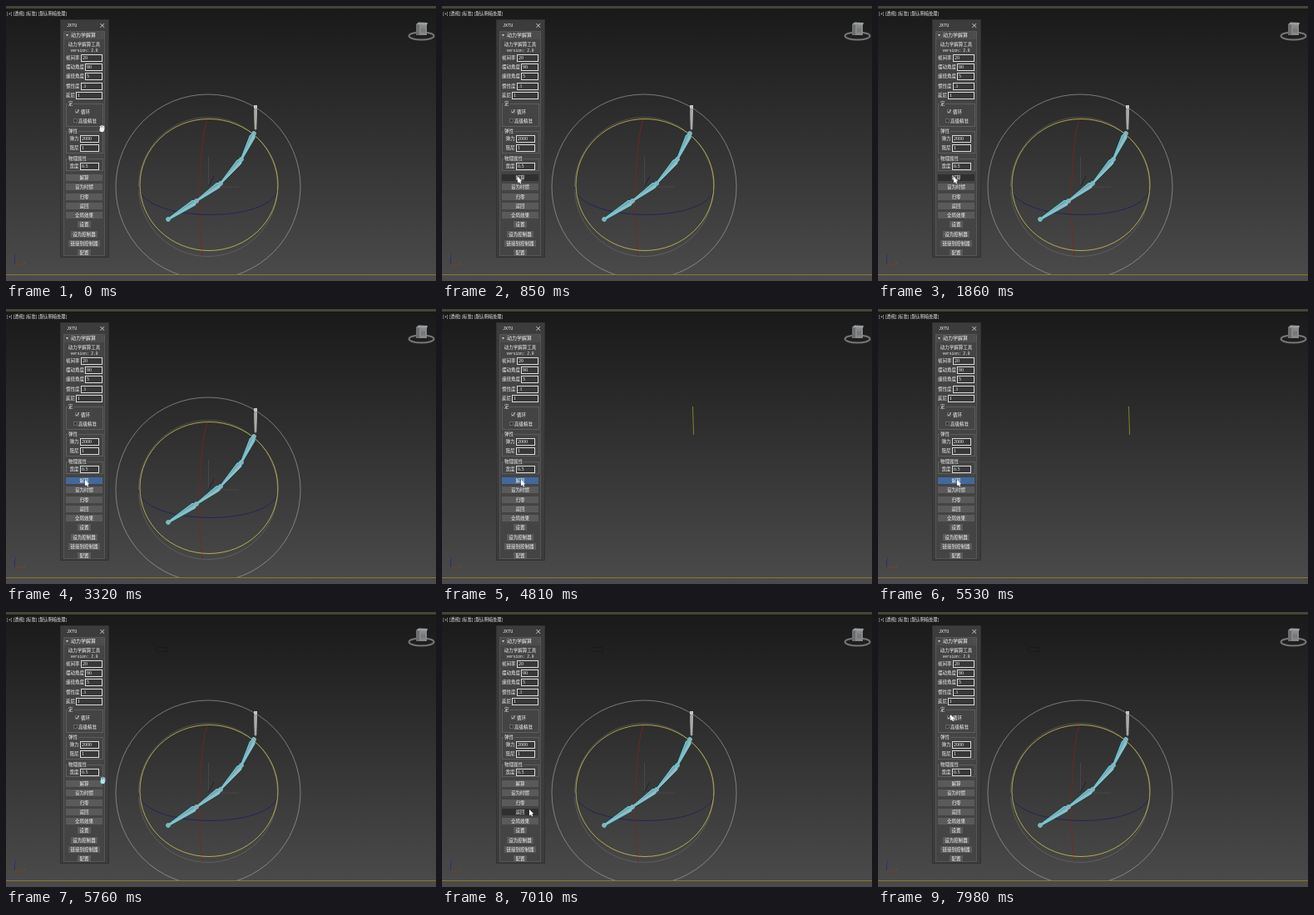
An HTML page with a canvas for the animation above (8000 ms loop, 517 px wide and 330 px high).

```html
<!DOCTYPE html>
<html lang="zh">
<head>
<meta charset="utf-8">
<style>
html, body { margin: 0; width: 517px; height: 330px; overflow: hidden; background: #333; }
canvas { display: block; }
</style>
</head>
<body>
<canvas id="stage" width="517" height="330"></canvas>
<script>
const c = document.getElementById('stage').getContext('2d');
const LOOP = 8000, TAU = Math.PI * 2;
const CJK = '"Noto Sans CJK SC", "Noto Sans CJK", sans-serif';
const MONO = '"Liberation Mono", monospace';
const SERIF = '"Liberation Serif", serif';
const CYAN = '#55dcec';

function path(points, closed) {
  c.beginPath();
  points.forEach(p => c.lineTo(...p));
  if (closed) c.closePath();
}
function stroke(color, width) { c.strokeStyle = color; c.lineWidth = width; c.stroke(); }
function fill(color) { c.fillStyle = color; c.fill(); }
function line(color, width, ...points) { path(points); stroke(color, width); }
function poly(color, ...points) { path(points, true); fill(color); }
function rect(x, y, w, h, color, edge) {
  if (color) { c.fillStyle = color; c.fillRect(x, y, w, h); }
  if (edge) { c.strokeStyle = edge; c.lineWidth = 1; c.strokeRect(x + .5, y + .5, w - 1, h - 1); }
}
function oval(x, y, rx, ry, color, width) {
  c.beginPath(); c.ellipse(x, y, rx, ry, 0, 0, TAU); stroke(color, width);
}
function text(s, x, y, align = 'left', size = 5.5, font = CJK, color = '#f4f4f4') {
  c.font = '500 ' + size + 'px ' + font;
  c.fillStyle = color; c.textAlign = align; c.textBaseline = 'middle';
  c.fillText(s, x, y);
}

function backdrop() {
  const g = c.createLinearGradient(0, 0, 0, 330);
  g.addColorStop(0, '#191919'); g.addColorStop(.5, '#323232'); g.addColorStop(1, '#4b4b4b');
  rect(0, 0, 517, 330, g);
  rect(0, 0, 517, 2, '#444440');
  rect(0, 2, 517, 1, '#4c4928');
  rect(0, 322, 517, 1, '#8b782b');
  text('[+] [透视] [标准] [默认明暗处理]', 1, 9.5, 'left', 5.2);
}

function viewCube() {
  oval(499.5, 36, 15, 4.5, '#747677', 2);
  rect(493, 22, 13, 13, '#86888a');
  rect(493, 22, 4, 13, '#6c6e70');
  poly('#9b9d9e', [493, 22], [496, 19.5], [507, 20], [506, 23]);
  text('前', 501.5, 29, 'center', 6, CJK, '#626466');
}

function tripod() {
  line('#26326c', 1, [10.5, 298], [10.5, 310]);
  line('#75401f', 1, [10, 310.5], [21, 310.5]);
  text('z', 8, 300, 'left', 5, SERIF, '#4c5590');
  text('x', 21, 308.5, 'left', 5, SERIF, '#85522f');
}

function gizmo() {
  c.save();
  c.beginPath(); c.rect(124, 4, 393, 318); c.clip();
  oval(243, 217, 111, 111, '#a6a6a6', .65);
  oval(243, 217, 83.5, 83.5, '#777', .5);
  line('#505050', .7, [243.5, 181], [243.5, 217], [280, 217]);
  line('#20203c', 1, [243, 217], [250, 204]);
  c.beginPath(); c.moveTo(243, 135);
  c.bezierCurveTo(232, 154, 230, 262, 236, 300); stroke('#7c271b', .8);
  c.beginPath(); c.moveTo(159, 217);
  c.bezierCurveTo(165, 260, 318, 262, 327, 220); stroke('#1e1e62', .8);
  oval(244, 214.5, 83, 79, '#d8cd58', .75);
  c.restore();
}

const joints = [[300, 121], [298, 153], [283, 184], [258, 213], [229, 234], [195, 256]];

function bone(a, b, wide, edge, light, shade) {
  const n = Math.hypot(b[0] - a[0], b[1] - a[1]);
  c.save();
  c.translate(...a);
  c.rotate(Math.atan2(b[1] - a[1], b[0] - a[0]));
  const shape = [[-1, 0], [4, wide], [n - 1, .8], [n - 1, -.8], [4, -wide]];
  poly(light, ...shape);
  poly(shade, ...shape.slice(0, 3));
  path(shape, true); stroke(edge, .9);
  c.restore();
}

function bones() {
  bone(joints[0], [300, 149], 1.5, '#a9a9a6', '#b9b9b5', '#8e8e8b');
  rect(298, 119, 4, 4, '#c4c4c0');
  for (let i = 1; i < 5; i++) bone(joints[i], joints[i + 1], 3.2, CYAN, '#9db9be', '#6fa9b3');
  for (const [x, y] of joints.slice(1)) {
    oval(x, y, 2.4, 2.4, CYAN, 1);
    fill('#8eb0b6');
  }
}

// A field's box starts where its label ends.
function field(label, value, x, y, right) {
  const left = Math.round(x + 1 + label.length * 5.6);
  y = Math.round(y);
  text(label, x, y);
  rect(left, y - 4, right - left, 9, '#383838', '#dadada');
  text(value, left + 2, y + .8, 'left', 6, SERIF);
}

function group(label, y, h) {
  rect(72, y, 45, h, null, '#5d5d5d');
  rect(74, y - 1, label.length * 5.5 + 2, 3, '#444');
  text(label, 75, y);
}

const options = ['帧间率:20', '摆动角度:90', '缠绕角度:5', '惯性度:.1', '延尼:1'];
const buttons = ['解算', '设为时惯', '归零', '返回', '全局效果', '设置', '设为控制器', '链接到控制器', '配置'];

function panel([px, py], busy) {
  rect(65, 16, 59, 286, '#3c3c3c', '#323232');
  text('JXTU', 73, 23.5, 'left', 5.2, MONO);
  text('×', 115.7, 23, 'center', 8);
  rect(69, 30, 50, 270, '#444', '#555');
  rect(70, 31, 48, 9, '#4c4c4c');
  poly('#ccc', [72, 34], [75, 34], [73.5, 36.5]);
  text('动力学解算', 78, 35, 'left', 6);
  text('::', 114, 35, 'left', 5, MONO, '#777');
  text('动力学解算工具', 94, 45.5, 'center');
  text('version: 2.0', 94, 53.5, 'center', 4.6, MONO);

  options.forEach((s, i) => field(...s.split(':'), 72, 62 + i * 11.2, 116));
  group('定', 117, 28);
  group('弹性', 150, 27);
  group('物理属性', 183, 15);
  field('弹力', '2000', 76.5, 159, 112);
  field('阻尼', '1', 76.5, 170, 112);
  field('宽度', '0.5', 76.5, 192, 112);

  rect(83, 124, 5, 5, '#393939', '#666');
  line('#eee', .9, [84, 126.5], [85.3, 128], [87.5, 124.5]);
  text('循环', 90, 126.5);
  rect(81, 135, 5, 5, '#393939', '#666');
  text('高级精准', 87, 137.5);

  buttons.forEach((label, i) => {
    const y = Math.round(206 + i * 11.25);
    const half = i < 5 ? 22 : Math.round(label.length * 2.75 + 2.5);
    const hover = Math.abs(px - 94) < half && Math.abs(py - y) < 4.5;
    rect(94 - half, y - 4, half * 2, 8, busy && i === 0 ? '#43689c' : hover ? '#2f2f2f' : '#5a5a5a');
    text(label, 94, y + .3, 'center');
  });
}

// Each move: begin, end, x, y of the pointer tip.
const moves = [
  [20, 800, 91, 205], [3170, 3320, 95, 205], [5600, 5760, 115, 198],
  [5760, 6180, 118, 207], [6420, 6960, 105, 237], [7230, 7980, 87, 123]
];
function pointer(t) {
  let x = 114, y = 143;
  for (const [from, to, tx, ty] of moves) {
    const k = Math.min(1, Math.max(0, (t - from) / (to - from)));
    const e = k * k * (3 - 2 * k);
    x += (tx - x) * e;
    y += (ty - y) * e;
  }
  return [x, y];
}

function drawPointer(tip, hand, color) {
  c.save(); c.translate(...tip);
  if (hand) {
    for (let i = 0; i < 4; i++) line(color, 1.1, [i * 1.5 - .8, 1 - Math.sin(i)], [i * 1.3, 5]);
    c.beginPath(); c.ellipse(1.3, 5.5, 2.8, 2.8, 0, 0, TAU); fill(color);
  } else {
    poly('#fff', [0, 0], [0, 7], [5, 5]);
    line('#fff', 1.3, [2, 5], [3.6, 8]);
  }
  c.restore();
}

function draw(t) {
  const tip = pointer(t);
  const redrawn = t >= 5590;
  const hand = t < 320 || (t >= 5680 && t < 6560);
  backdrop();
  if (redrawn) rect(180, 42, 14, 6, null, 'rgba(0,0,0,.18)');
  viewCube();
  tripod();
  if (t >= 4780 && !redrawn) line('#85822b', 1, [301.5, 117], [302.5, 151]);
  else { gizmo(); bones(); }
  panel(tip, t >= 2440 && t < 5640);
  drawPointer(tip, hand, redrawn ? '#a9e4f0' : '#f2f2f2');
}

const start = performance.now();
function tick() {
  draw((performance.now() - start) % LOOP);
  requestAnimationFrame(tick);
}
tick();
</script>
</body>
</html>
```
